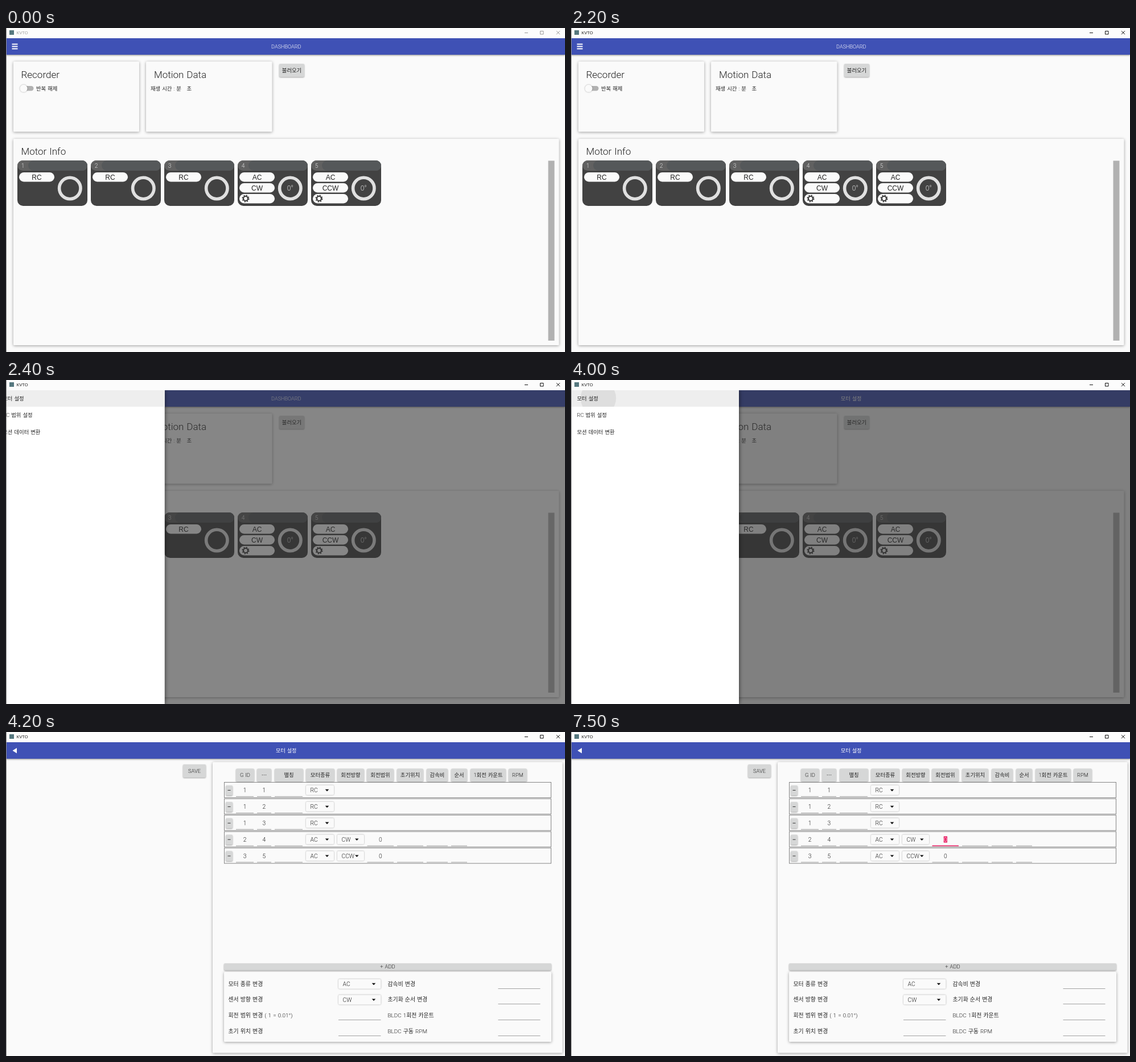
Animation, 982 px wide and 570 px high, one loop 8000 ms. Source, as an HTML page:

```html
<!DOCTYPE html>
<html lang="ko">
<head>
<meta charset="utf-8">
<style>
html, body { margin: 0; width: 100%; height: 100%; overflow: hidden; background: #fafafa; }
svg { display: block; }
text { font: 300 9.35px Roboto, "Noto Sans CJK KR", "Noto Sans CJK", sans-serif; fill: #222; word-spacing: .7px; white-space: pre; }
.title { font-size: 17px; }
.label { font-size: 9.9px; }
.value { font-size: 10.3px; }
.pill { font: 12px "Liberation Sans", Arial, sans-serif; }
.caption { font: 8px "Open Sans", sans-serif; }
.panel { fill: #fafafa; filter: drop-shadow(0 1.5px 2.5px rgba(0,0,0,.38)); }
.button { fill: #d6d7d7; filter: drop-shadow(0 1px 1.2px rgba(0,0,0,.35)); }
.combo { fill: #fafafa; filter: drop-shadow(0 .8px 1px rgba(0,0,0,.35)); }
.bar { fill: #3f51b5; filter: drop-shadow(0 1.5px 1.5px rgba(0,0,0,.45)); }
.hover { fill: #000; opacity: 0; }
</style>
</head>
<body>
<svg id="stage" width="982" height="570"></svg>
<script>
const LOOP = 8000, STEP = 100, DRAWER = 295, TOP = 18;
const range = n => [...Array(n).keys()];

const rect = (x, y, x2, y2, attrs = '', r = 0) =>
  `<rect x="${x}" y="${y}" width="${x2 - x}" height="${y2 - y}" rx="${r}" ${attrs}/>`;
const text = (s, x, y, cls = '', attrs = '') =>
  `<text x="${x}" y="${y}" class="${cls}" ${attrs}>${s}</text>`;
const centered = (s, x, y, cls = '', attrs = '') =>
  text(s, x, y, cls, 'text-anchor="middle" ' + attrs);
const path = (d, attrs = '') => `<path d="${d}" ${attrs}/>`;
const fill = c => `fill="${c}"`;
const panel = (x, y, x2, y2) => rect(x, y, x2, y2, 'class="panel"', 1.5);
const hover = (id, x, y, x2, y2) => rect(x, y, x2, y2, `id="${id}" class="hover"`, 2);
const button = (s, x, y, x2, y2, base) =>
  rect(x, y, x2, y2, 'class="button"', 2) + centered(s, (x + x2) / 2, base);
const underline = (x, x2, y, attrs = '') =>
  path(`M${x} ${y}H${x2}`, attrs || 'stroke="#a2a2a2"');
const combo = (s, x, x2, y, arrow) =>
  rect(x, y, x2, y + 17, 'class="combo"', 2) + text(s, x + 7.5, y + 12.2, 'value', fill('#333')) +
  path(`M${arrow - 3.3} ${y + 7}h6.6l-3.3 3.6z`, fill('#111'));

function gear(x, y) {
  const ring = (r, w, dash) =>
    `<circle cx="${x}" cy="${y}" r="${r}" fill="none" stroke="#3a3a3a" stroke-width="${w}" ${dash}/>`;
  const tooth = 2 * Math.PI * 5.6 / 16;
  return ring(4, 2.2, '') + ring(5.6, 1.8, `stroke-dasharray="${tooth}"`);
}

function motor(i) {
  const x = 20 + 129 * i, lines = i < 3 ? ['RC'] : ['AC', i < 4 ? 'CW' : 'CCW', ''];
  let out = rect(x, 233, x + 123, 313, fill('#424242'), 10) +
    rect(x, 233, x + 123, 251, fill('#616161'), 9) +
    rect(x + 19, 233, x + 123, 251, fill('#55585a'), 9) +
    centered(i + 1, x + 9.5, 246, 'value', 'style="fill:#ddd"') +
    `<circle cx="${x + 92.3}" cy="282" r="18.7" fill="none" stroke="#e0e0e0" stroke-width="5.6"/>`;
  lines.forEach((s, k) => {
    const y = 254 + 19 * k;
    out += rect(x + 3, y, x + 65, y + 16.5, fill('#fafafa'), 8.2) + centered(s, x + 34, y + 12.7, 'pill');
  });
  if (i > 2) out += gear(x + 14, 300) + centered('0°', x + 92.3, 286.3, '', 'style="font-size:12px;fill:#e0e0e0"');
  return out;
}

function dashboard() {
  return rect(0, TOP, 982, 570, fill('#fafafa')) +
    panel(13, 59, 234, 182.5) + text('Recorder', 26.5, 87.5, 'title') +
    rect(28, 102, 48.5, 110.5, fill('#b1b1b1'), 4.2) +
    '<circle cx="31" cy="106.3" r="6.5" class="combo"/>' + text('반복 해제', 53, 109.5) +
    panel(246, 59, 467.5, 182.5) + text('Motion Data', 260, 87.5, 'title') +
    text('재생 시간 : 분', 254, 109.5) + text('초', 317.5, 109.5) +
    button('불러오기', 480, 63, 524, 86, 77.5) + hover('load', 480, 63, 524, 86) +
    panel(13, 195, 971.5, 558) + text('Motor Info', 26.5, 222.5, 'title') +
    rect(952.5, 233.5, 963.5, 550, fill('#b1b1b1')) + range(5).map(motor).join('');
}

function motorRow(i) {
  const y = 88.5 + 28.9 * i, line = y + 25, base = y + 17.8, ac = i > 2;
  const cell = (s, x) => centered(s, x, base, 'value', fill('#333'));
  let out = rect(383.5, y, 957.5, y + 27, 'fill="none" stroke="#858585"') +
    rect(386, y + 5.5, 398, y + 23, 'class="button"', 2) +
    path(`M389.5 ${y + 14}h5`, 'stroke="#333"') +
    underline(404, 435, line) + underline(441, 466, line) + underline(472, 521, line) +
    cell(ac ? i - 1 : 1, 419.5) + cell(i + 1, 453.3) +
    combo(ac ? 'AC' : 'RC', 527, 576, y + 5.3, 564);
  if (ac) {
    const active = i == 3 ? 'id="activeLine" stroke="#a2a2a2"' : '';
    out += combo(i < 4 ? 'CW' : 'CCW', 582, 629, y + 5.3, 616.3) +
      underline(634.5, 681, line, active) + underline(687, 733, line) +
      underline(739, 776, line) + underline(782, 810, line);
    if (i == 3) out += rect(654.7, 183.5, 661, 194.5, 'id="selection" fill="#e91e63"');
    out += centered(0, 657.8, base, 'value', i == 3 ? 'id="activeText"' : '');
  }
  return out;
}

function settings() {
  const heads = [['G ID', 404, 436], ['⋯', 441, 466], ['별칭', 472, 522], ['모터종류', 527, 577],
    ['회전방향', 582, 629], ['회전범위', 634, 681], ['초기위치', 687, 733], ['감속비', 739, 776],
    ['순서', 782, 810], ['1회전 카운트', 816, 878], ['RPM', 883, 915]];
  const form = [['모터 종류 변경', '감속비 변경'], ['센서 방향 변경', '초기화 순서 변경'],
    ['회전 범위 변경 ( 1 = 0.01°)', 'BLDC 1회전 카운트'], ['초기 위치 변경', 'BLDC 구동 RPM']];
  return rect(0, TOP, 982, 570, fill('#fafafa')) +
    button('SAVE', 311, 57, 351, 80, 71.7) + panel(363, 53, 977.5, 564.5) +
    heads.map(([s, x, x2]) => button(s, x, 64.5, x2, 87, 79)).join('') +
    range(5).map(motorRow).join('') +
    hover('minus', 386, 123, 398, 140) + hover('type', 527, 181, 576, 197) + hover('turn', 582, 181, 629, 197) +
    button('+ ADD', 383, 407, 958, 419, 416.3) + panel(383, 422, 958, 545) +
    form.map(([left, right], i) => {
      const y = 446.7 + 27.7 * i, line = Math.round(y + 5) - .5;
      return text(left, 390.5, y, 'label') + text(right, 670.5, y, 'label') + underline(864.5, 938.5, line) +
        (i < 2 ? combo(['AC', 'CW'][i], 584, 658.5, y - 12, 646) : underline(584, 658.5, line));
    }).join('');
}

const drawer = () =>
  rect(0, TOP, DRAWER, 570, 'fill="#fff" style="filter:drop-shadow(1px 0 3px rgba(0,0,0,.5))"') +
  rect(0, TOP, DRAWER, 47, fill('#eee')) +
  '<circle id="ripple" cx="48" cy="32" fill="#000" fill-opacity=".065" clip-path="url(#item)"/>' +
  ['모터 설정', 'RC 범위 설정', '모션 데이터 변환'].map((s, i) => text(s, 10.5, 36 + 29.4 * i)).join('');

const stage = document.getElementById('stage');
stage.innerHTML =
  `<defs><clipPath id="item">${rect(0, TOP, DRAWER, 47)}</clipPath></defs>` +
  `<g id="home">${dashboard()}</g><g id="setup">${settings()}</g>` +
  rect(0, TOP, 982, 47, 'class="bar"') +
  path('M10.5 28.5h10M10.5 32.5h10M10.5 36.5h10', 'id="menu" stroke="#fff" stroke-width="2.1"') +
  path('M19 28v9.4l-7.5-4.7z', 'id="back" fill="#fff"') +
  centered('', 492.3, 36, '', 'id="heading" style="fill:#fff;font-size:9.1px"') +
  rect(0, TOP, 982, 570, 'id="dim" fill="#303030"') +
  `<g id="drawer">${drawer()}</g>` +
  rect(0, 0, 982, TOP, fill('#fcfcfc')) + rect(6, 4, 14, 12, fill('#56787f')) +
  text('KVTO', 18.5, 11, 'caption', 'id="caption"') +
  path('M911 8.5h6M938.5 5.5h5.5v5.5h-5.5zM967 5.2l6 6M973 5.2l-6 6', 'id="controls" fill="none"') +
  path('M.5 0V570', 'stroke="#8c8c8c"');

const $ = {};
stage.querySelectorAll('[id]').forEach(el => $[el.id] = el);
const clamp = v => Math.min(1, Math.max(0, v));
const show = (el, on) => el.style.display = on ? '' : 'none';
const shift = (el, x) => el.setAttribute('transform', `translate(${x} 0)`);

function draw(t) {
  const between = (a, b) => t >= a && t < b;
  const focused = t >= 2200, moved = t >= 4000, editing = t >= 7500;

  $.caption.style.fill = focused ? '#111' : '#999';
  $.controls.setAttribute('stroke', focused ? '#111' : '#999');
  $.heading.textContent = moved ? '모터 설정' : 'DASHBOARD';
  show($.menu, !moved);
  show($.back, moved);

  // drawer opens and closes in 200 ms, dimming the window with it
  const open = moved ? 1 - clamp((t - 4000) / 200) : clamp((t - 2211) / 200);
  shift($.drawer, (open - 1) * DRAWER);
  show($.drawer, open > 0);
  $.dim.style.opacity = .6 * open;
  $.ripple.setAttribute('r', t < 3900 ? 0 : 8 * 3.9 ** Math.min(3, (t - 3900) / 100));

  // pages slide half a width with a cubic ease-out
  const p = clamp((t - 4000) / 200), left = (1 - p) ** 3;
  shift($.home, -491 * (1 - left));
  $.home.style.opacity = 1 - p;
  shift($.setup, 491 * left);
  $.setup.style.opacity = 1 - left;
  show($.setup, p > 0);

  $.load.style.opacity = between(1200, 1400) ? .04 : between(1400, 1500) ? .02 : 0;
  $.minus.style.opacity = between(4500, 4700) ? .05 : 0;
  $.type.style.opacity = between(4800, 5100) ? .03 : 0;
  $.turn.style.opacity = between(5200, 5400) ? .03 : 0;

  $.activeLine.setAttribute('stroke', editing ? '#e91e63' : t >= 5500 ? '#111' : '#a2a2a2');
  $.activeLine.setAttribute('stroke-width', t >= 5500 ? 1.5 : 1);
  $.activeText.style.fill = editing ? '#fff' : '#333';
  show($.selection, editing);
}

const start = performance.now();
function frame() {
  const t = (performance.now() - start) % LOOP;
  draw(Math.floor(t / STEP) * STEP);
  requestAnimationFrame(frame);
}
frame();
</script>
</body>
</html>
```
